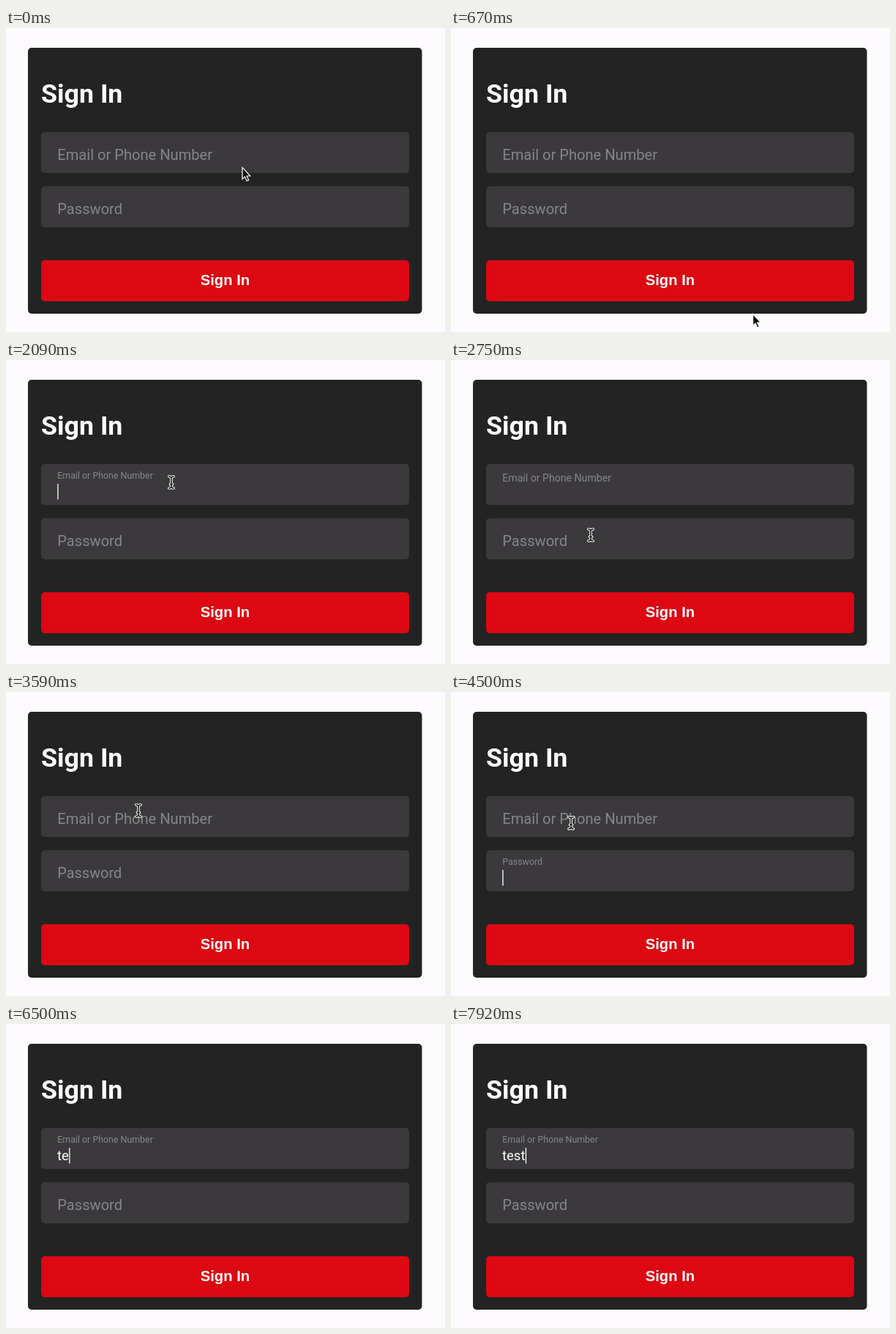
These frames come from a looping animation (600x415 px, 8000 ms). An HTML page with a canvas:

```html
<!DOCTYPE html>
<html lang="en">
<head>
<meta charset="utf-8">
<title>Sign-in form</title>
<style>
html, body { margin: 0; width: 100%; height: 100%; overflow: hidden; background: #fdfbfe; }
canvas { display: block; }
</style>
</head>
<body>
<canvas id="stage" width="600" height="415"></canvas>
<script>
const ctx = document.getElementById('stage').getContext('2d');
const LOOP = 8000;
const STEP = 1000 / 12;
const FLOAT_MS = 250;
const BLINK_MS = 500;
const GLIDE_MS = 400;
const FIELD_H = 56;

const email = { label: 'Email or Phone Number', y: 142, spans: [[1830, 2708], [3600, 4080], [4830, Infinity]] };
const password = { label: 'Password', y: 216, spans: [[2800, 3383], [4200, 4700]] };
const fields = [email, password];

// Pointer rests; it glides into each one and arrives at the given time
const rests = [
  { at: 0, x: 323, y: 190 },
  { at: 540, x: 428, y: 396 },
  { at: 990, x: 268, y: 335 },
  { at: 1624, x: 226, y: 167 },
  { at: 2700, x: 191, y: 239 },
  { at: 3400, x: 181, y: 162 },
  { at: 4080, x: 178, y: 239 },
  { at: 4624, x: 160, y: 161 }
];

// Typing starts steadily and speeds up a little
const word = 'test';
const keyTime = i => 6240 + 250 * i - 3 * i ** 3;

const clamp = v => Math.max(0, Math.min(1, v));
const smooth = u => u * u * (3 - 2 * u);

// Equivalent of the CSS "ease" curve, solved by bisection
function ease(x) {
  if (x <= 0) return 0;
  if (x >= 1) return 1;
  const curve = (u, a, b) => 3 * (1 - u) ** 2 * u * a + 3 * (1 - u) * u * u * b + u ** 3;
  let u = 0.5;
  for (let d = 0.25; d > 1e-6; d /= 2) u += curve(u, 0.25, 0.25) < x ? d : -d;
  return curve(u, 0.1, 1);
}

function box(x, y, w, h, color) {
  ctx.fillStyle = color;
  ctx.beginPath();
  ctx.roundRect(x, y, w, h, 5);
  ctx.fill();
}

function text(str, x, y, font, color) {
  ctx.font = font;
  ctx.fillStyle = color;
  ctx.fillText(str, x, y);
}

function drawField({ label, y, spans }, t, value = '', lastKey = 0) {
  box(48, y, 503, FIELD_H, '#3b393c');
  const up = spans.reduce((sum, [focus, blur]) =>
    sum + ease((t - focus) / FLOAT_MS) - ease((t - blur) / FLOAT_MS), 0);
  text(label, 70.3, y + 38.2 - 18.6 * up, `${20.1 - 7.7 * up}px Roboto, sans-serif`, '#868587');
  text(value, 70, y + 44, '18.5px Roboto, sans-serif', '#fff');

  const span = spans.find(([focus, blur]) => t >= focus && t < blur);
  if (!span) return;
  const since = t - Math.max(span[0], lastKey);
  if (since % (2 * BLINK_MS) < BLINK_MS) {
    ctx.fillRect(70.3 + ctx.measureText(value).width, y + 27, 1.3, 21.5);
  }
}

function pointerAt(t) {
  const i = rests.findIndex(r => r.at > t);
  if (i < 0) return rests[rests.length - 1];
  const from = rests[i - 1], to = rests[i];
  const s = smooth(clamp(1 - (to.at - t) / GLIDE_MS));
  return { x: from.x + (to.x - from.x) * s, y: from.y + (to.y - from.y) * s };
}

function drawArrow() {
  const shape = new Path2D('M0 .4V16.2L3.5 13 6.1 18.8 8.7 17.6 6.1 12H10.8Z');
  ctx.fillStyle = '#111';
  ctx.fill(shape);
  ctx.strokeStyle = '#fff';
  ctx.lineWidth = 1.2;
  ctx.stroke(shape);
}

function drawBeam() {
  const shape = new Path2D('M-3.2 -8Q0 -8 0 -5.5V5.5Q0 8 -3.2 8M3.2 -8Q0 -8 0 -5.5M0 5.5Q0 8 3.2 8M-1.6 2.5H1.6');
  ctx.lineCap = 'round';
  for (const [color, width] of [['#fff', 3.6], ['#111', 1.5]]) {
    ctx.strokeStyle = color;
    ctx.lineWidth = width;
    ctx.stroke(shape);
  }
}

function drawPointer(t) {
  const { x, y } = pointerAt(t);
  const overField = t > 0 && fields.some(f => y > f.y && y < f.y + FIELD_H);
  ctx.save();
  ctx.translate(x, y);
  if (overField) drawBeam(); else drawArrow();
  ctx.restore();
}

function draw(t) {
  ctx.fillStyle = '#fdfbfe';
  ctx.fillRect(0, 0, 600, 415);
  box(30, 27, 538.5, 363, '#232323');
  text('Sign In', 48, 102, 'bold 35.8px Roboto, sans-serif', '#fff');

  const count = [...word].filter((_, i) => keyTime(i) <= t).length;
  drawField(email, t, word.slice(0, count), count ? keyTime(count - 1) : 0);
  drawField(password, t);

  box(48, 317, 503, FIELD_H, '#dc0812');
  text('Sign In', 265.8, 351, 'bold 20.2px "Liberation Sans", Arial, sans-serif', '#fff');
  if (!count) drawPointer(t);
}

const start = performance.now();
function tick() {
  const t = (performance.now() - start) % LOOP;
  draw(Math.floor(t / STEP) * STEP);
  requestAnimationFrame(tick);
}
tick();
</script>
</body>
</html>
```
